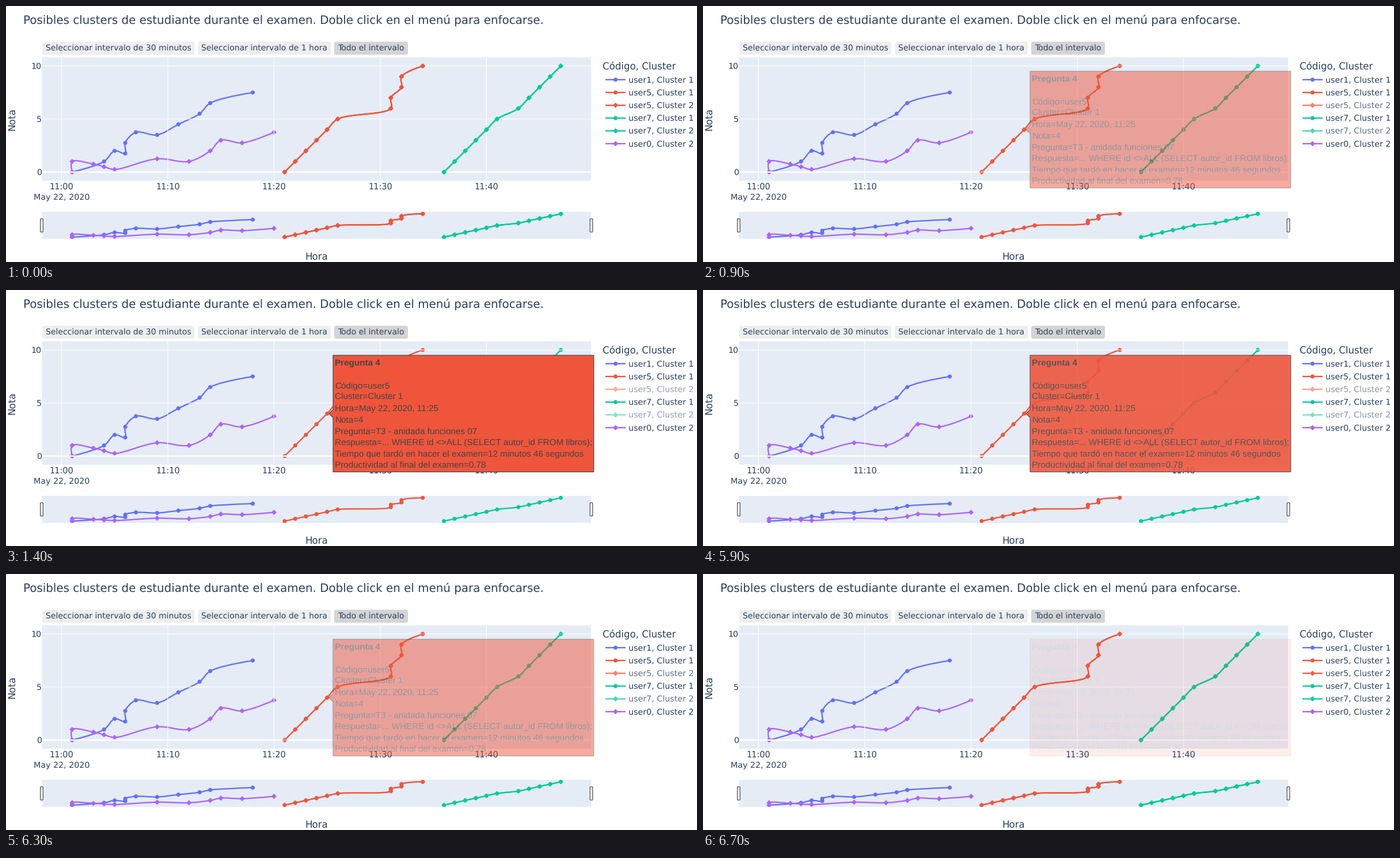
Write a matplotlib script that moves like this. It is 1200 px wide and 444 px high and loops after 6.8 s.

```python
import numpy as np
import matplotlib.pyplot as plt
from matplotlib.animation import FuncAnimation
from matplotlib.patches import Circle, FancyBboxPatch, PathPatch, Polygon, Rectangle
from matplotlib.path import Path

W, H, DPI = 1200, 444, 100
PT = 72 / DPI  # points per pixel
INK, PAPER, DARK = "#2a3f5f", "#e5ecf6", "#444444"
BLUE, RED, GREEN, PURPLE = "#636efa", "#ef553b", "#00cc96", "#ab63fa"
LEFT, RIGHT = 62.5, 1016
LINE, DOT, HAIR = 2.34, 3.5, 1.17

# (minutes after 11:00, mark)
USER1 = [(1, 0), (4, 1), (5, 2), (6, 1.75), (6, 2.75), (7, 3.75), (9, 3.5),
         (11, 4.5), (13, 5.5), (14, 6.5), (18, 7.5)]
USER0 = [(1, 0), (1, 1), (3, .75), (4, .5), (5, .25), (9, 1.25), (12, 1),
         (14, 2), (15, 3), (17, 2.75), (20, 3.75)]
USER5 = list(zip([21, 22, 23, 24, 25, 26, 31, 31, 32, 32, 34], range(11)))
USER7 = list(zip([36, 37, 38, 39, 40, 41, 43, 44, 45, 46, 47], range(11)))

TIP = ["", "Código=user5", "Cluster=Cluster 1", "Hora=May 22, 2020, 11:25",
       "Nota=4", "Pregunta=T3 - anidada funciones 07",
       "Respuesta=... WHERE id <>ALL (SELECT autor_id FROM libros);",
       "Tiempo que tardó en hacer el examen=12 minutos 46 segundos",
       "Productividad al final del examen=0.78"]

plt.rcParams["text.hinting"] = "none"
fig = plt.figure(figsize=(W / DPI, H / DPI), dpi=DPI, facecolor="white")


def layer(z):
    ax = fig.add_axes([0, 0, 1, 1], zorder=z)
    ax.set_xlim(0, W)
    ax.set_ylim(H, 0)
    ax.axis("off")
    return ax


def fade(ax, alpha):
    """Give a whole layer one common opacity."""
    ax.set_visible(alpha > 0)
    ax.set_agg_filter(lambda img, dpi: (img * [1, 1, 1, alpha], 0, 0))


def label(ax, x, y, text, size, ha="left", color=INK, font="DejaVu Sans", **kw):
    ax.text(x, y, text, fontsize=size * PT, ha=ha, va="baseline",
            color=color, family=font, **kw)


def box(ax, x0, y0, x1, y1, radius, fill, edge="none"):
    ax.add_patch(FancyBboxPatch(
        (x0, y0), x1 - x0, y1 - y0, fc=fill, ec=edge, lw=HAIR * PT,
        boxstyle=f"round,pad=0,rounding_size={radius}", snap=False))


def rule(ax, xs, ys, color, width):
    ax.plot(xs, ys, color=color, lw=width * PT, snap=False,
            solid_capstyle="butt")


def dot(x, y, color, diamond):
    if diamond:
        r = 1.3 * DOT
        return Polygon([(x - r, y), (x, y - r), (x + r, y), (x, y + r)],
                       fc=color, ec="none")
    return Circle((x, y), DOT, fc=color, ec="none")


def spline(pts):
    """Open centripetal Catmull-Rom curve with quadratic end pieces."""
    handles = []
    for a, p, b in zip(pts, pts[1:], pts[2:]):
        d1, d2 = a - p, b - p
        r1, r2 = np.hypot(*d1) ** .5, np.hypot(*d2) ** .5
        num = r2 ** 2 * d1 - r1 ** 2 * d2
        total = 3 * (r1 + r2)
        handles.append((p + num / (r2 * total), p - num / (r1 * total)))
    verts = [pts[0], handles[0][0], pts[1]]
    codes = [Path.MOVETO] + [Path.CURVE3] * 2
    for h, k, p in zip(handles, handles[1:], pts[2:]):
        verts += [h[1], k[0], p]
        codes += [Path.CURVE4] * 3
    verts += [handles[-1][1], pts[-1]]
    codes += [Path.CURVE3] * 2
    return Path(verts, codes)


def px(minute):
    return 96.4 + 18.45 * minute


def main_y(mark):
    return 288 - 18.4 * mark


def mini_y(mark):
    return 400.8 - 4.04 * mark


def trace(ax, data, color, diamond=False):
    for to_y in (main_y, mini_y):
        pts = [np.array([px(m), to_y(v)]) for m, v in data]
        parts = [PathPatch(spline(pts), fc="none", ec=color, lw=LINE * PT,
                           capstyle="butt", joinstyle="round")]
        parts += [dot(x, y, color, diamond) for x, y in pts]
        for part in parts:
            ax.add_patch(part)
            if to_y is mini_y:
                part.set_clip_path(Path([(LEFT, 357), (RIGHT, 357),
                                         (RIGHT, 404), (LEFT, 404)]),
                                   ax.transData)


def entry(ax, row, text, color, diamond=False):
    y = 127.8 + 22.2 * row
    rule(ax, [1041, 1076], [y, y], color, LINE)
    ax.add_patch(dot(1058.5, y, color, diamond))
    label(ax, 1081, y + 5.2, text, 14.3)


base, twins, dimmed, tip = (layer(z) for z in range(1, 5))

# headings and range buttons
label(base, 30, 31, "Posibles clusters de estudiante durante el examen. "
      "Doble click en el menú para enfocarse.", 19.87)
for x0, x1, fill, text in [
        (63, 327, "#eeeeee", "Seleccionar intervalo de 30 minutos"),
        (333.5, 564, "#eeeeee", "Seleccionar intervalo de 1 hora"),
        (570, 698, "#d4d4d4", "Todo el intervalo")]:
    box(base, x0, 62, x1, 84.5, 3.5, fill)
    label(base, (x0 + x1) / 2, 77, text, 14.05, "center")

# plot areas, grid and axis labels
for top, bottom in [(89, 303), (357, 404)]:
    base.add_patch(Rectangle((LEFT, top), RIGHT - LEFT, bottom - top,
                             fc=PAPER, ec="none", snap=False))
for m in range(0, 50, 10):
    rule(base, [px(m)] * 2, [89, 303], "white", HAIR)
    label(base, px(m), 318, f"11:{m:02d}", 14.5, "center")
for v in (0, 5, 10):
    y = main_y(v)
    rule(base, [LEFT, RIGHT], [y, y], "white", HAIR if v else 2 * HAIR)
    label(base, 62, y + 5, str(v), 14.3, "right")
label(base, px(0), 336.5, "May 22, 2020", 14.3, "center")
label(base, 539, 440, "Hora", 16.6, "center")
label(base, 15, 196, "Nota", 16.6, "center", rotation=90,
      rotation_mode="anchor")

# curves
trace(base, USER1, BLUE)
trace(base, USER5, RED)
trace(base, USER7, GREEN)
trace(base, USER0, PURPLE, True)
trace(twins, USER5, RED, True)
trace(twins, USER7, GREEN, True)
for x in (62, 1016.5):
    box(base, x - 2.3, 369, x + 2.3, 392, 1.2, "white", DARK)

# legend
label(base, 1036, 110, "Código, Cluster", 16.6)
entry(base, 0, "user1, Cluster 1", BLUE)
entry(base, 1, "user5, Cluster 1", RED)
entry(dimmed, 2, "user5, Cluster 2", RED, True)
entry(base, 3, "user7, Cluster 1", GREEN)
entry(dimmed, 4, "user7, Cluster 2", GREEN, True)
entry(base, 5, "user0, Cluster 2", PURPLE, True)

# hover box with its arrow
ty = main_y(4)
tip.add_patch(Polygon([(561, ty), (568, ty - 7), (568, 113.2), (1020.7, 113.2),
                       (1020.7, 315.5), (568, 315.5), (568, ty + 7)],
                      fc=RED, ec=DARK, lw=HAIR * PT, snap=False))
label(tip, 571.3, 131, "Pregunta 4", 15.2, color=DARK,
      font="Liberation Sans", weight="bold")
for i, text in enumerate(TIP, 1):
    label(tip, 571.3, 131 + 19.75 * i, text, 15.2, color=DARK,
          font="Liberation Sans")


def update(i):
    t = float(np.clip(min(i - 4, 68 - i) / 10, 0, 1))
    fade(twins, 1 - t)
    fade(dimmed, 1 - t / 2)
    fade(tip, t)
    return []


anim = FuncAnimation(fig, update, frames=68, interval=100,
                     init_func=lambda: update(0), repeat=True, repeat_delay=0)
plt.show()
```
